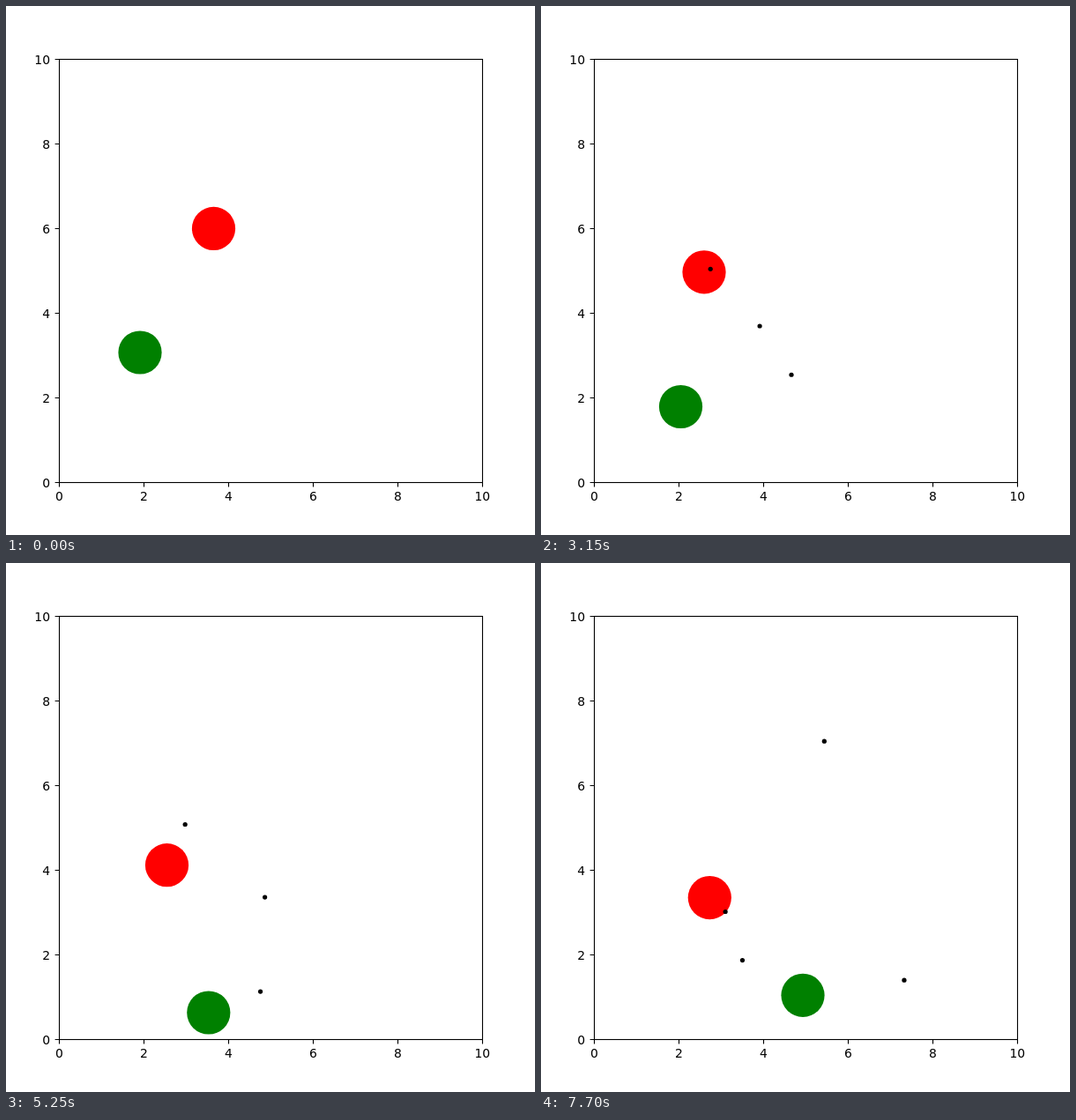
These frames come from a looping animation (600x600 px, 8000 ms). An HTML page:

```html
<!DOCTYPE html>
<html lang="en">
<head>
<meta charset="utf-8">
<title>Two discs</title>
<style>
  html, body { margin: 0; width: 100%; height: 100%; overflow: hidden; background: #fff; }
  svg { display: block; width: 600px; height: 600px; }
  text { font: 13.89px "DejaVu Sans", sans-serif; }
</style>
</head>
<body>
<svg id="stage" viewBox="0 0 600 600"></svg>
<script>
const STEP = 350, LOOP = 8000;
const LOW = 60, HIGH = 540;
const SHOT_EVERY = 4, SHOT_SPEED = 21.6;

// Turning points: [step, x, y]; the discs move evenly between them
const redPath = [
  [0, 235.5, 252.4], [1, 243, 259.6], [5, 213.8, 288], [9, 185, 301.8],
  [11, 170.9, 316.7], [13, 167.9, 330.2], [15, 182.5, 342.7],
  [18, 203.2, 364.2], [20, 198, 377], [22, 191.3, 379.6]
];
const greenPath = [
  [0, 152, 393], [1, 158, 394], [5, 136.8, 412], [7, 151.2, 433],
  [9, 158.5, 454.5], [11, 182, 476.4], [15, 229.8, 510],
  [17, 253, 505.6], [22, 297, 490.3]
];

// Red fires a dot at regular steps, each at its own angle in degrees
const shotAngles = [73.7, 71.8, 38.5, -38.6, 68.8, 59];

const stage = document.getElementById("stage");

function add(tag, attrs, text = "") {
  const el = document.createElementNS("http://www.w3.org/2000/svg", tag);
  for (const name in attrs) el.setAttribute(name, attrs[name]);
  el.textContent = text;
  return stage.appendChild(el);
}

function along(path, step) {
  const i = Math.max(1, path.findIndex(p => p[0] >= step));
  const [s0, x0, y0] = path[i - 1], [s1, x1, y1] = path[i];
  const u = (step - s0) / (s1 - s0);
  return [x0 + (x1 - x0) * u, y0 + (y1 - y0) * u];
}

function place(el, [x, y]) {
  el.setAttribute("cx", x);
  el.setAttribute("cy", y);
}

const green = add("circle", { r: 24.6, fill: "#008000" });
const red = add("circle", { r: 24.6, fill: "#f00" });
const dots = shotAngles.map((deg, i) => {
  const fired = i * SHOT_EVERY, angle = deg * Math.PI / 180;
  return {
    birth: fired + 1,
    from: along(redPath, fired),
    vx: SHOT_SPEED * Math.cos(angle),
    vy: SHOT_SPEED * Math.sin(angle),
    el: add("circle", { r: 2.6, fill: "#000" })
  };
});

// Axes
const line = { fill: "none", stroke: "#000", "stroke-width": 1.11 };
add("rect", { x: 60.5, y: 60.5, width: 480, height: 480, ...line });
for (let v = 0; v <= 10; v += 2) {
  const x = LOW + v * 48, y = HIGH - v * 48;
  add("path", { d: `M${x + 0.5} 540.5v4.9M60.5 ${y + 0.5}h-4.9`, ...line });
  add("text", { x: x + 0.3, y: 561, "text-anchor": "middle" }, v);
  add("text", { x: 50, y: y + 6, "text-anchor": "end" }, v);
}

function draw(now) {
  const step = Math.floor((now % LOOP) / STEP);
  place(red, along(redPath, step));
  place(green, along(greenPath, step));
  for (const d of dots) {
    const age = step - d.birth;
    const x = d.from[0] + d.vx * age, y = d.from[1] + d.vy * age;
    const inside = x > LOW && x < HIGH && y > LOW && y < HIGH;
    d.el.setAttribute("visibility", age >= 0 && inside ? "visible" : "hidden");
    place(d.el, [x, y]);
  }
}

const start = performance.now();
function tick() {
  draw(performance.now() - start);
  requestAnimationFrame(tick);
}
tick();
</script>
</body>
</html>
```
